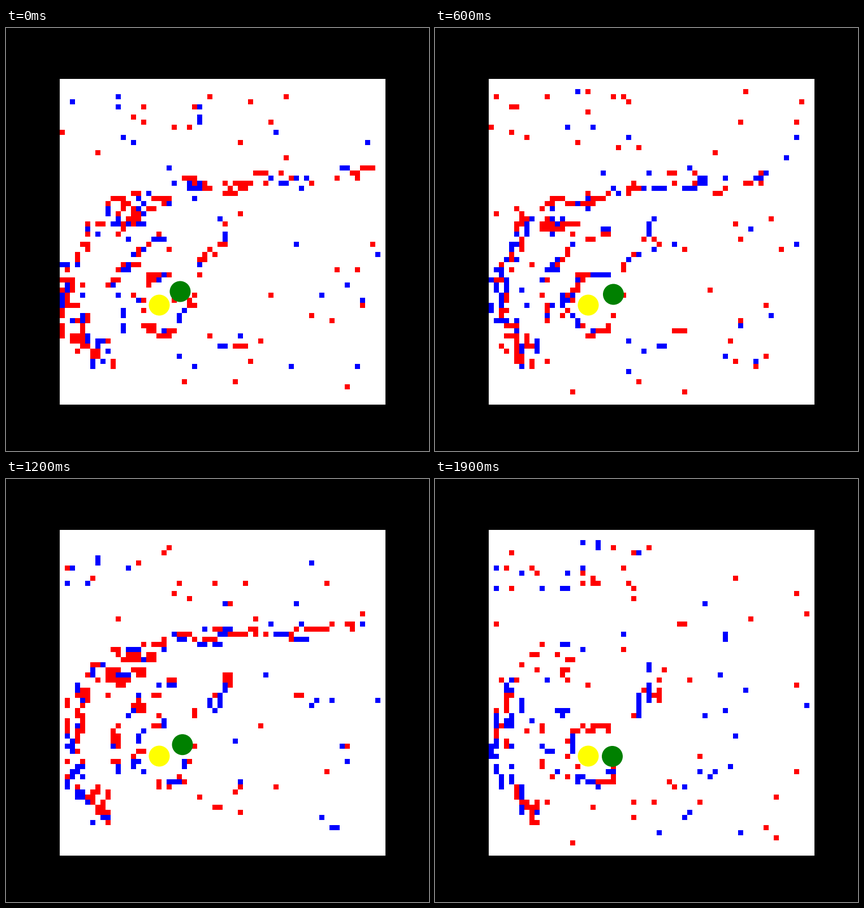
A matplotlib script for the animation above (2 s loop, 748 by 748 pixels).

```python
import numpy as np
import matplotlib.pyplot as plt
from matplotlib.animation import FuncAnimation
from matplotlib.patches import Circle

SIZE, DPI = 748, 100
FRAMES, INTERVAL = 20, 100
LEFT, TOP, CELL, GRID = 95, 90, 9, 64
RED, BLUE = (255, 0, 0), (0, 0, 255)

# Edges that fire events: x0, y0, x1, y1, bow, spread, count
LASTING = [
    (130, 405, 118, 495, 12, 12, 36),
    (112, 505, 178, 592, 4, 12, 42),
    (134, 395, 190, 312, -10, 9, 20),
    (194, 440, 208, 518, 10, 5, 11),
    (386, 335, 386, 395, 0, 5, 11),
    (376, 370, 342, 414, 0, 5, 7),
    (342, 604, 424, 533, 0, 6, 6),
]
# Edges that die away near the end of the loop
FADING = [
    (185, 352, 242, 342, 0, 8, 25),
    (195, 312, 275, 301, 5, 8, 26),
    (305, 357, 196, 435, 10, 4, 24),
    (290, 276, 540, 270, 0, 10, 40),
    (545, 270, 640, 264, 0, 14, 8),
]
# Stray events: x range, y range, count
STRAYS = [
    (100, 345, 110, 200, 13),
    (100, 660, 110, 262, 11),
    (400, 660, 330, 520, 11),
    (330, 620, 500, 645, 8),
    (100, 370, 270, 635, 11),
]
# Marker path
MARK_T = [0, 2, 6, 10, 14, 16, 19]
MARK_X = [308, 315, 315.5, 319, 305, 312, 313.5]
MARK_Y = [466, 480, 471, 476, 463.5, 477.5, 490.5]


def on_edge(x0, y0, x1, y1, bow, u):
    dx, dy = x1 - x0, y1 - y0
    b = 4 * u * (1 - u) * bow / np.hypot(dx, dy)
    return x0 + u * dx - b * dy, y0 + u * dy + b * dx


def put(img, x, y, color):
    col, row = int((x - LEFT) // CELL), int((y - TOP) // CELL)
    if 0 <= col < GRID and 2 <= row < GRID - 2:
        img[row, col] = color


def events(f):
    rng = np.random.default_rng(100 + f)
    img = np.full((GRID, GRID, 3), 255, np.uint8)
    end = np.interp(f, [15.5, 19], [0, 1])
    red = 0.57 - 0.08 * end

    def amount(n, keep):
        return round(n * (1 + (keep - 1) * end) * rng.uniform(0.88, 1.12))

    def pick():
        return RED if rng.random() < red else BLUE

    def run(x, y, flat):
        color = pick()
        for k in range(min(rng.geometric(0.65), 3)):
            step = k * CELL
            put(img, x + step * flat, y + step * (not flat), color)

    for x0, x1, y0, y1, n in STRAYS:
        for _ in range(amount(n, 1.4)):
            put(img, rng.uniform(x0, x1), rng.uniform(y0, y1), pick())

    for edges, keep in ((LASTING, 0.85), (FADING, 0.15)):
        for *shape, spread, n in edges:
            x0, y0, x1, y1, _ = shape
            flat = abs(x1 - x0) > abs(y1 - y0)
            for _ in range(amount(n / 1.4, keep)):
                x, y = on_edge(*shape, rng.random())
                jx, jy = rng.normal(0, spread, 2)
                run(x + jx, y + jy, flat)

    # Ring around the yellow disc, sparser at its upper right
    for _ in range(amount(25, 1.3)):
        a = rng.uniform(0, 2 * np.pi)
        if np.cos(a) > 0.3 and np.sin(a) < 0 and rng.random() < 0.5:
            a = np.pi - a
        jx, jy = rng.normal(0, 4, 2)
        run(278 + 44 * np.cos(a) + jx, 487 + 52 * np.sin(a) + jy,
            abs(np.sin(a)) > 0.75)

    # Cells that fire again and again
    for x, y in ((333, 472), (243, 643), (316, 517)):
        if rng.random() < 0.6:
            put(img, x, y, RED)
    return img


fig = plt.figure(figsize=(SIZE / DPI, SIZE / DPI), dpi=DPI, facecolor="black")
ax = fig.add_axes([0, 0, 1, 1])
side = CELL * GRID
field = ax.imshow(events(0), extent=(LEFT, LEFT + side, TOP + side, TOP),
                  interpolation="nearest", aspect="auto")
ax.set_xlim(0, SIZE)
ax.set_ylim(SIZE, 0)
ax.axis("off")
ax.add_patch(Circle((271, 490), 18.5, fc="yellow", ec="none", zorder=3))
marker = ax.add_patch(Circle((308, 466), 18.5, fc="green", ec="none", zorder=4))


def update(f):
    field.set_data(events(f))
    marker.center = np.interp(f, MARK_T, MARK_X), np.interp(f, MARK_T, MARK_Y)
    return field, marker


anim = FuncAnimation(fig, update, frames=FRAMES, interval=INTERVAL,
                     repeat=True, repeat_delay=0)
plt.show()
```
